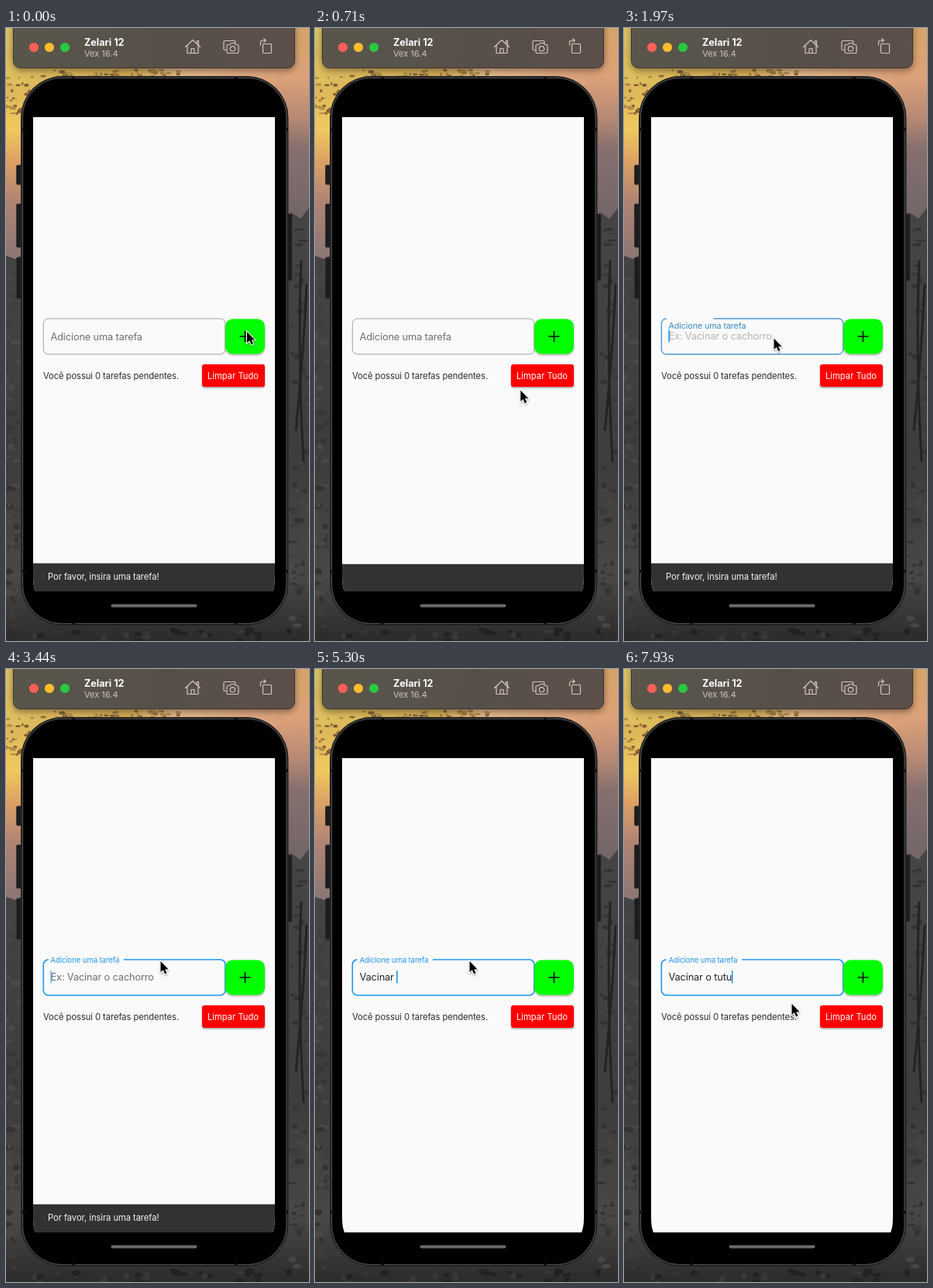
An HTML page that plays this animation: 391 px wide and 791 px high, repeating every 7.99 s.

```html
<!DOCTYPE html>
<html lang="pt">
<head>
<meta charset="utf-8">
<title>Lista de tarefas</title>
<style>
html, body { margin: 0; width: 100%; height: 100%; overflow: hidden; background: #333; }
svg { display: block; width: 100vw; height: 100vh; font-family: Inter, Roboto, sans-serif; }
text { white-space: pre; }
.input { font-size: 12.8px; letter-spacing: -.15px; }
.body { font-size: 11.2px; letter-spacing: -.06px; }
.icon { fill: none; stroke: #d3c6be; stroke-width: 1.2; stroke-linejoin: round; stroke-linecap: round; }
</style>
</head>
<body>
<svg viewBox="0 0 391 791" preserveAspectRatio="none">
  <defs>
    <linearGradient id="skyLeft" x2="0" y2="1">
      <stop offset="0" stop-color="#dcc566"/><stop offset=".2" stop-color="#d8b257"/>
      <stop offset=".42" stop-color="#efc95f"/><stop offset=".55" stop-color="#dda263"/>
      <stop offset=".72" stop-color="#b08474"/><stop offset="1" stop-color="#857374"/>
    </linearGradient>
    <linearGradient id="skyRight" x2="0" y2="1">
      <stop offset="0" stop-color="#d3a468"/><stop offset=".2" stop-color="#dda279"/>
      <stop offset=".38" stop-color="#b58874"/><stop offset=".5" stop-color="#86706f"/>
      <stop offset="1" stop-color="#655e62"/>
    </linearGradient>
    <linearGradient id="skyTop">
      <stop offset="0" stop-color="#dfbf5e"/><stop offset=".45" stop-color="#d2aa55"/>
      <stop offset=".62" stop-color="#e3b78c"/><stop offset="1" stop-color="#d99f78"/>
    </linearGradient>
    <linearGradient id="ground" x2="0" y2="1">
      <stop offset="0" stop-color="#464545"/><stop offset=".6" stop-color="#3e3d3d"/>
      <stop offset=".85" stop-color="#4a4846"/><stop offset="1" stop-color="#2c2b2b"/>
    </linearGradient>
    <linearGradient id="bar">
      <stop offset="0" stop-color="#5a554c"/><stop offset=".55" stop-color="#57504a"/>
      <stop offset="1" stop-color="#5d504a"/>
    </linearGradient>
    <filter id="soft" x="-20%" y="-20%" width="140%" height="150%">
      <feDropShadow dx="0" dy="1.4" stdDeviation="1.1" flood-opacity=".38"/>
    </filter>
    <filter id="barShade" x="-10%" y="-20%" width="120%" height="150%">
      <feDropShadow dx="0" dy="3" stdDeviation="4" flood-opacity=".4"/>
    </filter>
    <clipPath id="screen"><path id="screenShape" d="M35 115H347V708Q347 720 344 727H38Q35 720 35 708Z"/></clipPath>
  </defs>

  <!-- wallpaper -->
  <rect width="200" height="310" fill="url(#skyLeft)"/>
  <rect x="200" width="191" height="310" fill="url(#skyRight)"/>
  <rect y="40" width="360" height="34" fill="url(#skyTop)"/>
  <path d="M0 294L12 298L30 288V250H350L368 238L380 246L391 232V791H0Z" fill="url(#ground)"/>
  <g id="leaves"></g>
  <path d="M381 300Q376 420 384 560M388 330Q384 420 374 520" fill="none" stroke="#242323" stroke-width="3"/>

  <!-- simulator bar -->
  <g filter="url(#barShade)">
    <rect x="9.500" y="-12" width="363" height="63.500" rx="9" fill="url(#bar)" stroke="#3a3531" stroke-width="1"/>
  </g>
  <circle cx="36" cy="25" r="6.100" fill="#ff5f57"/>
  <circle cx="56" cy="25" r="6.100" fill="#febc2e"/>
  <circle cx="76" cy="25" r="6.100" fill="#28c840"/>
  <text x="101" y="23" font-size="12.600" font-weight="700" fill="#fff">Zelari 12</text>
  <text x="101" y="37" font-size="11" fill="#cdc3bc">Vex 16.4</text>
  <g class="icon">
    <path d="M231.500 24.500L241 15.500L250.500 24.500M234 22.500V32.500H248V22.500M239 32.500V26.500H243V32.500M246.500 19.500V16.500H248.500V21.500"/>
    <path d="M284 28.500H282.500Q281 28.500 281 27V18Q281 16.500 282.500 16.500H294.500Q296 16.500 296 18V19.500"/>
    <path d="M286.500 21.500H289L290.500 19.500H295L296.500 21.500H298.500Q300 21.500 300 23V31Q300 32.500 298.500 32.500H286.500Q285 32.500 285 31V23Q285 21.500 286.500 21.500Z"/>
    <circle cx="292.500" cy="26.800" r="3.200"/>
    <rect x="331.500" y="20.500" width="11" height="12" rx="1.200"/>
    <path d="M328.500 22V18.500Q328.500 16 331 16H335M332.800 13.600L335.200 16L332.800 18.400"/>
  </g>

  <!-- phone -->
  <g fill="#1c1c1c" stroke="#333" stroke-width=".8">
    <rect x="13.500" y="177" width="7" height="25" rx="1.500"/>
    <rect x="13.500" y="227" width="7" height="56" rx="1.500"/>
    <rect x="13.500" y="296" width="7" height="53" rx="1.500"/>
    <rect x="363" y="240" width="6" height="86" rx="1.500"/>
  </g>
  <rect x="19.500" y="62.500" width="344.500" height="708" rx="53" fill="#1b1b1b" stroke="#262626"/>
  <rect x="21.500" y="64.500" width="340.500" height="704" rx="51" fill="#000" stroke="#505050" stroke-width="1.200"/>
  <path d="M20 131H24M360 131H364M20 701H24M360 701H364M87 63V66M297 63V66M87 767V770M297 767V770" stroke="#111" stroke-width="4"/>
  <rect x="135.500" y="743.500" width="111" height="4" rx="2" fill="#6a6a6a"/>
  <use href="#screenShape" fill="#fafafa"/>

  <!-- app -->
  <path id="border" fill="none"/>
  <text id="label" class="input" y="4.600">Adicione uma tarefa</text>
  <text id="hint" class="input" x="57.500" y="402" fill="#6e6e6e">Ex: Vacinar o cachorro</text>
  <text id="typed" class="input" x="57.500" y="402" fill="#262626"></text>
  <rect id="caret" y="389" width="1.600" height="16.500" rx=".8" fill="#2196f3"/>
  <rect x="283" y="375.500" width="51" height="45" rx="9.600" fill="#0f0" filter="url(#soft)"/>
  <path d="M301.500 398H315.500M308.500 391V405" stroke="#111" stroke-width="1.700"/>
  <text class="body" x="48" y="452.500" fill="#2b2b2b">Você possui 0 tarefas pendentes.</text>
  <rect x="253" y="434" width="81" height="29" rx="3.200" fill="#f00" filter="url(#soft)"/>
  <text x="260" y="452.700" font-size="11.200" fill="#fff">Limpar Tudo</text>
  <g clip-path="url(#screen)">
    <g id="snack">
      <rect x="35" width="312" height="40" fill="#323232"/>
      <text id="notice" x="54" y="21.700" class="body" fill="#f5f5f5">Por favor, insira uma tarefa!</text>
    </g>
  </g>
  <path id="mouse" d="M0 0V14.200L3.300 11.300L5.600 16.600L8 15.500L5.700 10.400H10.100Z" fill="#000" stroke="#fff" stroke-width="1.800" paint-order="stroke" filter="url(#soft)"/>
</svg>
<script>
const LOOP = 7990;
const $ = id => document.getElementById(id);
const clamp = v => Math.min(1, Math.max(0, v));
const mix = (a, b, p) => a + (b - a) * p;
const set = (el, attrs) => { for (const k in attrs) el.setAttribute(k, attrs[k]); };

// cubic-bezier(.4, 0, .2, 1), solved by bisection
function ease(x) {
  if (x <= 0 || x >= 1) return clamp(x);
  const bez = (a, b, u) => 3 * a * u * (1 - u) ** 2 + 3 * b * u * u * (1 - u) + u ** 3;
  let lo = 0, hi = 1;
  for (let i = 0; i < 24; i++) {
    const mid = (lo + hi) / 2;
    if (bez(.4, .2, mid) < x) lo = mid; else hi = mid;
  }
  return bez(0, 1, lo);
}

// keys are [time, ...values], joined by straight lines
function track(keys, t) {
  const i = keys.findIndex(k => k[0] > t);
  if (i < 0) return keys[keys.length - 1].slice(1);
  if (i === 0) return keys[0].slice(1);
  const a = keys[i - 1], b = keys[i], p = (t - a[0]) / (b[0] - a[0]);
  return a.slice(1).map((v, n) => mix(v, b[n + 1], p));
}

const MOUSE = [
  [0, 311, 392], [49, 311, 392], [50, 312, 392], [230, 312, 392], [400, 340, 402],
  [560, 312, 440], [710, 265.5, 467], [860, 230, 560], [1010, 207, 650],
  [1250, 140, 699], [1400, 74, 698], [1550, 112, 580], [1730, 193.5, 400.5],
  [2440, 193.5, 400.5], [2550, 211, 399], [2730, 211, 399], [2900, 199.5, 377],
  [7140, 199.5, 377], [7420, 306, 396], [7620, 284, 415], [7930, 216.5, 432]
];
const CARET = [
  [1969, 0], [1970, 1], [2440, 1], [2550, 0], [2730, 0], [2900, 1], [3439, 1],
  [3440, .65], [3550, 0], [3599, 0], [3600, 1], [7140, 1], [7250, 0], [7600, 0], [7710, 1]
];
const TASK = 'Vacinar o tutu';
const KEYS = [3600, 4130, 4420, 4720, 4830, 4940, 5240, 5300, 5540, 5590, 6190, 6290, 6400, 6550];

function drawField(t) {
  const p = t < 1970 ? 0 : ease((t - 1890) / 200);
  const tint = base => `rgb(${[33, 150, 243].map(c => Math.round(mix(base, c, p)))})`;
  const gap = p ? mix(54.5, 152, p) : 54.7;
  set($('border'), {
    d: `M${gap} 375H276.600a6.400 6.400 0 0 1 6.400 6.400V414.600a6.400 6.400 0 0 1 -6.400 6.400H54.700` +
       `a6.400 6.400 0 0 1 -6.400 -6.400V381.400a6.400 6.400 0 0 1 6.400 -6.400`,
    stroke: tint(150), 'stroke-width': mix(.9, 1.6, p)
  });
  set($('label'), {
    transform: `translate(57.500 ${mix(398, 375.5, p)}) scale(${mix(1, .75, p)})`, fill: tint(112)
  });

  const text = TASK.slice(0, KEYS.filter(k => k <= t).length);
  const typed = $('typed');
  if (typed.textContent !== text) typed.textContent = text;
  $('hint').setAttribute('opacity', text ? 0 : p < 1 ? p * .8 : 1);
  set($('caret'), {
    x: 57.3 + (text ? typed.getComputedTextLength() : 0), opacity: track(CARET, t)[0]
  });
}

function drawSnack(t) {
  let open, fade = 1;
  if (t < 505) open = 1 - (t - 245) / 250;
  else if (t < 2000) {
    open = (t - 515) / 250;
    fade = clamp((open - .88) / .12);
  } else open = 1 - (t - 4735) / 250;
  $('snack').setAttribute('transform', `translate(0 ${727 - 36.3 * ease(open)})`);
  $('notice').setAttribute('opacity', fade);
}

function draw(t) {
  drawField(t);
  drawSnack(t);
  $('mouse').setAttribute('transform', `translate(${track(MOUSE, t)})`);
}

// foliage and undergrowth
function scatter() {
  let seed = 11;
  const rnd = () => (seed = seed * 16807 % 2147483647) / 2147483647;
  let out = '';
  const patch = (n, x, y, w, h, size, colors) => {
    for (let i = 0; i < n; i++) {
      const rx = size * (.4 + rnd()), ry = size * (.3 + rnd() * .6);
      out += `<ellipse cx="${x + rnd() * w}" cy="${y + rnd() * h}" rx="${rx}" ry="${ry}" fill="${colors[Math.floor(rnd() * colors.length)]}"/>`;
    }
  };
  patch(40, 0, 62, 55, 50, 3, ['#7d5a34', '#8f6a38', '#b08a48']);
  patch(40, 60, 54, 165, 9, 3, ['#9a7a40', '#b08c4a', '#80633a']);
  patch(30, 0, 310, 18, 260, 5, ['#403f3f', '#4a4949', '#383737']);
  patch(30, 0, 580, 18, 200, 5, ['#343333', '#4a4846', '#3d3c3c']);
  patch(30, 368, 250, 23, 300, 5, ['#3a3939', '#444343', '#333']);
  patch(30, 368, 560, 23, 220, 5, ['#343333', '#484644', '#3d3c3c']);
  patch(40, 20, 776, 350, 15, 5, ['#232222', '#3a3836', '#2e2d2c']);
  $('leaves').innerHTML = out;
}

scatter();
const start = performance.now();
function tick() {
  draw((performance.now() - start) % LOOP);
  requestAnimationFrame(tick);
}
tick();
</script>
</body>
</html>
```
